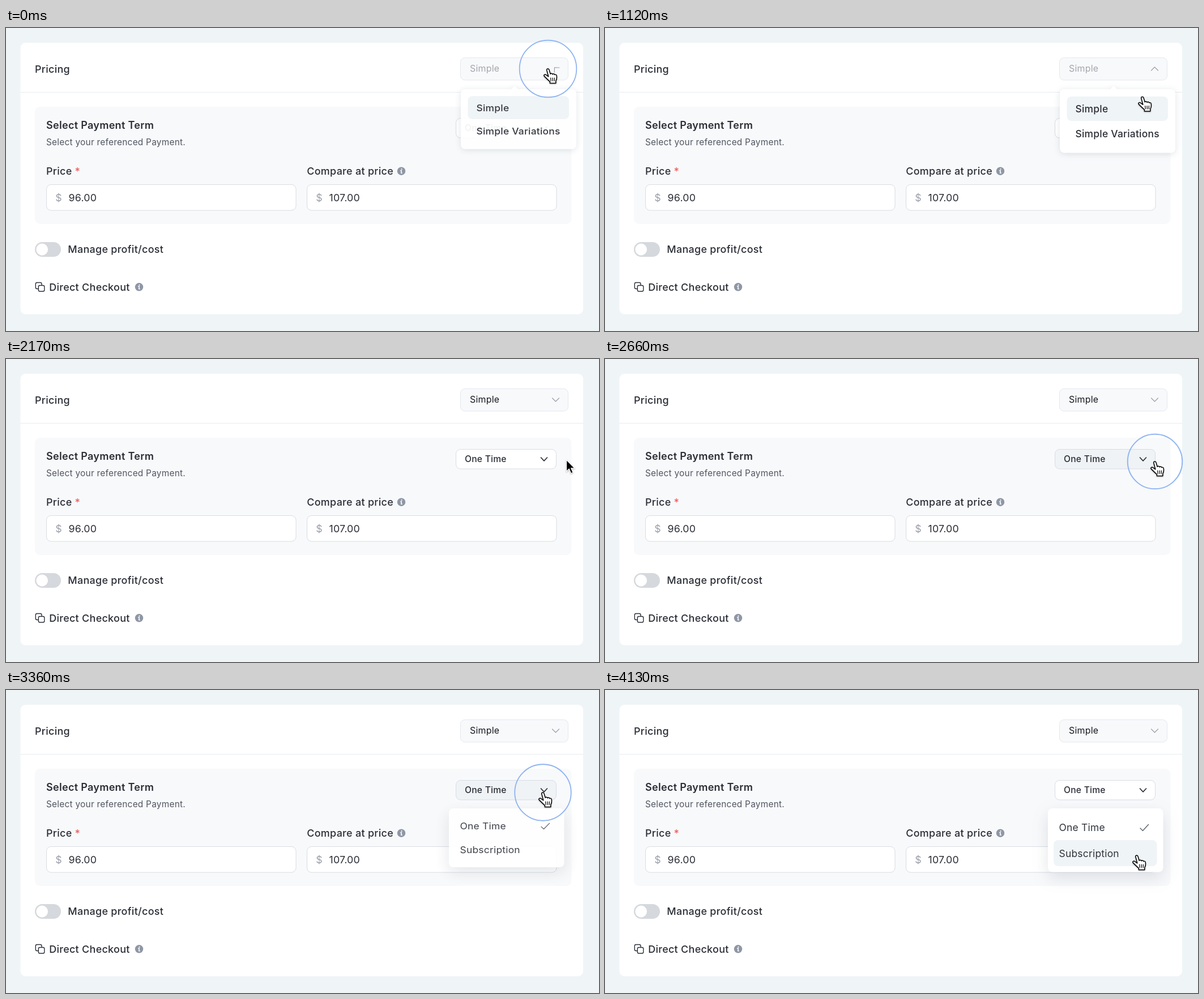
Recreate the animation shown at these times as an HTML page. Size 1047x535 px, loop 4.2 s.

```html
<!DOCTYPE html>
<html lang="en">
<head>
<meta charset="utf-8">
<title>Pricing</title>
<style>
html, body { margin: 0; width: 100%; height: 100%; overflow: hidden; background: #eff4f7; }
svg { display: block; font-family: Inter, "Open Sans", sans-serif; fill: #2a2d35; }
text { white-space: pre; letter-spacing: .25px; font-size: 17.4px; }
.label { font-size: 17.9px; font-weight: 500; letter-spacing: .32px; }
.field { fill: #fff; stroke: #d9dce3; }
.money { font-size: 17.8px; }
.muted { fill: #9a9fa9; }
.line { fill: none; stroke-linecap: round; stroke-linejoin: round; }
.hover { fill: #eff4f7; }
.menu { filter: drop-shadow(0 2px 6px rgba(60, 85, 105, .16)); }
.low { filter: drop-shadow(0 10px 14px rgba(60, 75, 95, .15)); }
</style>
</head>
<body>
<svg width="1047" height="535" viewBox="0 0 1047 535">
  <defs>
    <g id="info">
      <circle r="7.2" fill="#8f97a5"/>
      <path d="M-1.4-1H.4L-.4 3.4H1.3" class="line" stroke="#fff" stroke-width="1.5"/>
      <circle cx=".5" cy="-3.5" r="1.1" fill="#fff"/>
    </g>
  </defs>
  <rect x="25.5" y="26" width="993.5" height="479.5" rx="9" fill="#fff"/>
  <path d="M25.5 113.5H1019" stroke="#e8ebee"/>
  <text x="51" y="78.5" class="label">Pricing</text>
  <rect x="802.5" y="52.5" width="190" height="39.5" rx="8" fill="#f8f9fb" stroke="#e4e8ed"/>
  <text id="kind" x="819" y="77.3" style="font-size:15.9px">Simple</text>
  <path id="caret" d="M-6-3L0 3L6-3" class="line" stroke="#9a9fa9" stroke-width="1.2"/>

  <rect x="51" y="139" width="947.5" height="207" rx="9" fill="#f8f9fb"/>
  <text x="71" y="178.3" style="font-size:18px;font-weight:600;letter-spacing:.3px">Select Payment Term</text>
  <text x="71" y="207" style="font-size:15.4px" fill="#505560">Select your referenced Payment.</text>
  <rect id="term" x="794.5" y="159.5" width="177" height="34.5" rx="8" class="field"/>
  <text x="810" y="182.4" style="font-size:15.6px;font-weight:500">One Time</text>
  <path d="M944.5 174L950 179.8L955.5 174" class="line" stroke="#2d313b" stroke-width="1.7"/>

  <text x="71" y="258.7" class="label">Price <tspan fill="#f05e5e">*</tspan></text>
  <text x="531.3" y="258.7" class="label">Compare at price</text>
  <use href="#info" x="698" y="252.7"/>
  <rect x="71.5" y="276.5" width="440.5" height="45.5" rx="8" class="field"/>
  <rect x="531.5" y="276.5" width="440.5" height="45.5" rx="8" class="field"/>
  <text x="87.3" y="306.2" class="money muted">$</text>
  <text x="110.5" y="306.2" class="money">96.00</text>
  <text x="547.3" y="306.2" class="money muted">$</text>
  <text x="570.5" y="306.2" class="money">107.00</text>

  <rect x="51" y="378" width="46" height="26" rx="13" fill="#d5d8dc"/>
  <circle cx="63.7" cy="391" r="10.4" fill="#fff"/>
  <text x="109.3" y="397.3" class="label">Manage profit/cost</text>
  <g class="line" stroke="#2d313b" stroke-width="1.4">
    <rect x="57.3" y="454.5" width="10.5" height="10.5" rx="2.5"/>
    <path d="M57 460.5H54.8A2.5 2.5 0 0 1 52.3 458V452A2.5 2.5 0 0 1 54.8 449.5H60.5A2.5 2.5 0 0 1 63 452V454.2"/>
  </g>
  <text x="76.2" y="463.9" class="label">Direct Checkout</text>
  <use href="#info" x="235" y="457.3"/>

  <g id="kindMenu" class="menu">
    <path d="M891 109L898 102L905 109Z" fill="#fff"/>
    <rect x="803" y="108" width="204" height="112.5" rx="8" fill="#fff"/>
    <rect id="kindHover" x="815.5" width="178.5" height="43" rx="8" class="hover"/>
    <g style="font-weight:500">
      <text x="830.5" y="149">Simple</text>
      <text x="830.5" y="192.8">Simple Variations</text>
    </g>
  </g>
  <g id="termMenu" class="low">
    <rect x="782" y="209" width="203.5" height="112.5" rx="8" fill="#fff"/>
    <rect id="termHover" x="792" width="182.5" height="46" rx="8" class="hover"/>
    <g fill="#2f333b">
      <text x="801.5" y="249.3">One Time</text>
      <text x="801.5" y="294.5">Subscription</text>
    </g>
    <path d="M945 244L949.5 248.5L959.5 237.5" class="line" stroke="#5c616a" stroke-width="1.4"/>
  </g>

  <circle id="ring" fill="none"/>
  <g id="cursor" style="filter:drop-shadow(0 1px 1px rgba(0,0,0,.3))">
    <path id="arrow" d="M.5 0V20.5L5.2 16L8.6 24L12.2 22.4L8.8 14.8H15Z" fill="#000" stroke="#fff" stroke-width="1.3"/>
    <g id="hand" class="line" stroke="#000" stroke-width="1.5">
      <path fill="#fff" d="M-2.2 2.4C-2.6-.4 1-.8 1.8 1.4L4.2 9.2C5 7.6 7.6 8 8 9.8C9 8.4 11.4 8.8 11.8 10.6C13 9.6 15 10.4 15.2 12.2C15.8 16 15.4 19 13.8 21.4V25.5H3.4V22.6C.6 20.4-2.8 17-6.4 13.4C-8.2 11.2-5.6 9.2-3.6 10.6L.8 13.8Z"/>
      <path stroke-width="1.2" d="M4.6 16L5.2 21.5M8 16L8.4 21.5M11.3 16V21.5"/>
    </g>
  </g>
</svg>
<script>
const LOOP = 4200, STEP = 70, FADE = 300;
const el = id => document.getElementById(id);
const set = (id, attrs) => { for (const k in attrs) el(id).setAttribute(k, attrs[k]); };
const show = (id, on) => set(id, { visibility: on ? 'visible' : 'hidden' });
const clamp = v => Math.min(1, Math.max(0, v));
const smooth = p => p * p * (3 - 2 * p);
const quad = p => 1 - (1 - p) ** 2;
const quint = p => 1 - (1 - p) ** 5;

// time, x, y of the pointer tip
const path = [
  [0, 957, 72], [210, 957, 72], [490, 950, 142], [700, 946, 186], [840, 946, 187],
  [1120, 949, 121.5], [1470, 672, 98.5], [1680, 672, 98.5], [2170, 989, 178], [2380, 971, 181],
  [2870, 971, 181], [3080, 948, 181], [3430, 948, 181], [3780, 939, 292], [LOOP, 939, 292]
];
const clicks = [-150, 1540, 2525, 3215];
const kindTimes = [-130, 1561], termTimes = [3239, Infinity];

function pointer(t) {
  const i = path.findIndex(p => p[0] > t);
  const [t0, x0, y0] = path[i - 1], [t1, x1, y1] = path[i];
  const e = smooth((t - t0) / (t1 - t0));
  return [x0 + (x1 - x0) * e, y0 + (y1 - y0) * e];
}

// 0 = closed, 1 = open
function openness(t, [start, end], ease) {
  return t < end ? ease(clamp((t - start) / FADE)) : 1 - ease(clamp((t - end) / FADE));
}

function drawMenu(id, top, amount) {
  show(id, amount > 0.005);
  set(id, { opacity: amount, transform: `translate(0 ${top}) scale(1 ${amount}) translate(0 ${-top})` });
}

function drawRing(t, x, y) {
  const age = t - clicks.findLast(c => c <= t);
  const e = quad(clamp(age / 180));
  show('ring', age < 280);
  set('ring', {
    cx: x, cy: y, r: 52 * e ** 1.15, 'stroke-width': 9.8 - 8.3 * e,
    stroke: `rgb(${283 - 147 * e},${281 - 106 * e},${269 - 29 * e})`,
    opacity: 1 - clamp((age - 180) / 100)
  });
}

function draw(t) {
  const [x, y] = pointer(t);
  const over = (l, top, r, b) => x >= l && x <= r && y >= top && y <= b;
  const kindOpen = t >= kindTimes[0] && t < kindTimes[1];
  const termOpen = t >= termTimes[0];
  const onTerm = !kindOpen && over(794, 159, 972, 194);
  const onKindItem = kindOpen && over(815, 120, 994, 208);
  const onTermItem = termOpen && over(792, 219, 975, 311);

  drawMenu('kindMenu', 107, openness(t, kindTimes, quint));
  drawMenu('termMenu', 209, openness(t, termTimes, quint));
  set('kindHover', { y: onKindItem && y > 164.5 ? 165 : 121 });
  set('termHover', { y: y > 264.5 ? 265 : 219 });
  el('kindHover').style.opacity = kindOpen ? 1 : 0;
  show('termHover', onTermItem);
  set('kind', { fill: kindOpen ? '#a3a6ab' : '#17191e' });
  const turn = 180 * openness(t, kindTimes, p => smooth(quad(p)));
  set('caret', { transform: `translate(970.5 72) rotate(${turn})` });
  el('term').style.fill = onTerm ? '#eff3f6' : '#fff';

  drawRing(t, x, y);
  const hand = onTerm || onKindItem || onTermItem || over(802, 52, 993, 92);
  show('hand', hand);
  show('arrow', !hand);
  set('cursor', { transform: `translate(${x} ${y})` });
}

const begin = performance.now();
function tick() {
  const t = (performance.now() - begin) % LOOP;
  draw(Math.floor(t / STEP) * STEP);
  requestAnimationFrame(tick);
}
tick();
</script>
</body>
</html>
```
